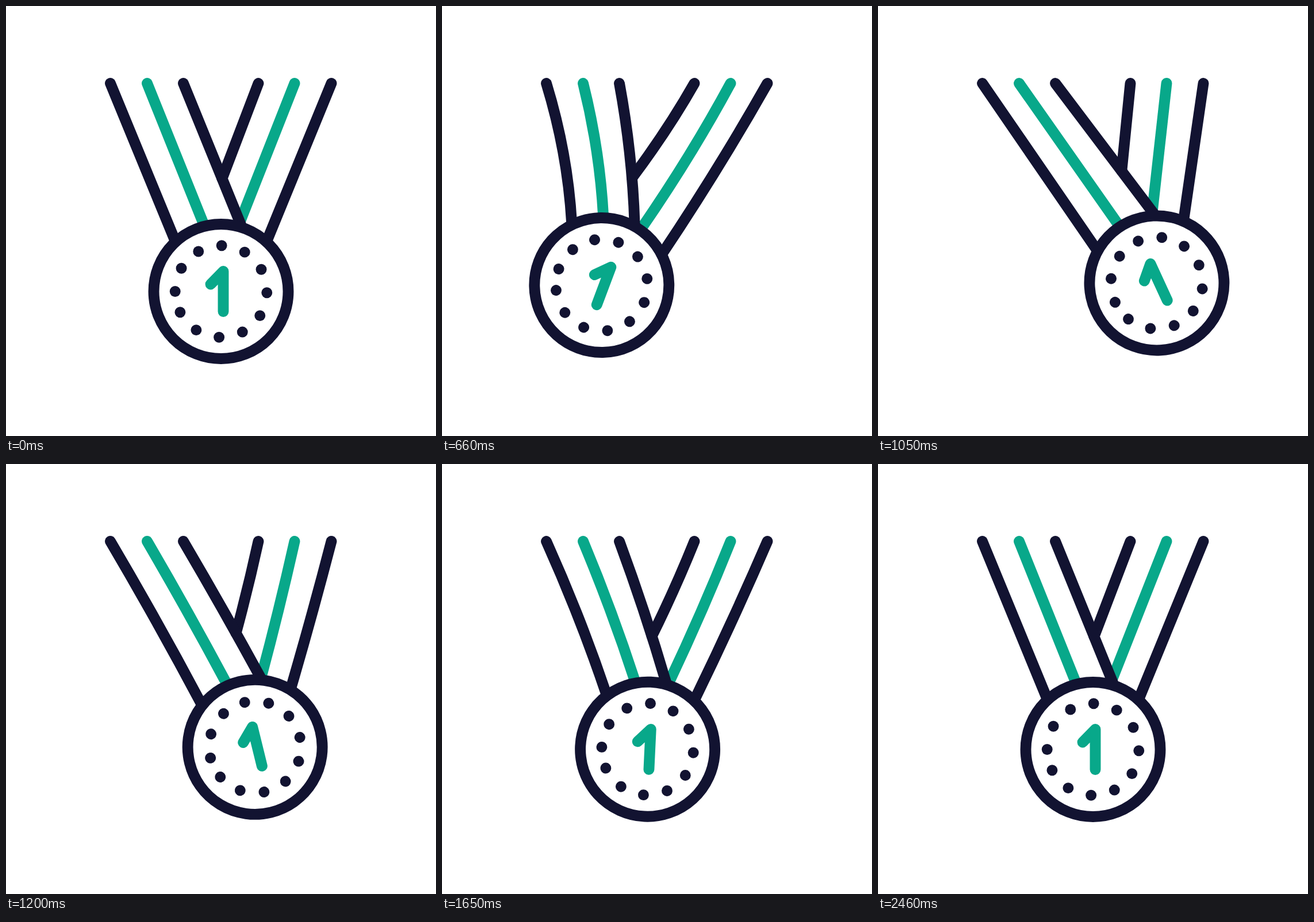
Animation, 748 px wide and 748 px high, one loop 3.09 s. Source, as an HTML page:

```html
<!DOCTYPE html>
<html lang="en">
<head>
<meta charset="utf-8">
<title>Swinging medal</title>
<style>
  html, body { margin: 0; width: 100%; height: 100%; overflow: hidden; background: #fff; }
  svg { display: block; width: 100vw; height: 100vh; }
  path, circle { fill: none; stroke: #121331; stroke-width: 18.9; stroke-linecap: round; stroke-linejoin: round; }
  .green { stroke: #08a88a; }
  .disc { fill: #fff; }
</style>
</head>
<body>
<svg viewBox="0 0 748 748">
  <g id="ribbons"></g>
  <g id="medal">
    <circle class="disc" r="117"/>
    <g id="dots"></g>
    <path class="green" d="M-18 -12.5L4 -35V35"/>
  </g>
</svg>
<script>
const LOOP = 3090, STEP = 30, END = 2460, TOP = 134.5;

// Key times of the decaying swing, with the pose reached at each one
const times = [0, 603, 990, 1480, 1970, END];
const shift = [0, -109.5, 117, -30, 19, 0];
const spin = [0, 23.5, -26, 5, -3.2, 0];
const bow = [0, 1, 0, 0.65, 0, 0];

// x: top end, angle: place on the rim at rest, turn: change of that angle per key
const bands = {
  rightOuter: { x: 566, angle: 42, bend: 4, turn: [0, 22.7, -20, 3.8, -5, 0] },
  rightMid: { x: 502, angle: 15, bend: 5, turn: [0, 22.5, -20, 5.2, -4, 0], green: true },
  rightInner: { x: 439, bend: 4 },
  leftOuter: { x: 181.5, angle: -42, bend: 8, turn: [0, 18.5, -20, 7.6, -1, 0] },
  leftMid: { x: 245.5, angle: -14.4, bend: 6, turn: [0, 18, -20, 6.3, -2.2, 0], green: true },
  leftInner: { x: 308.5, angle: 17, bend: 5, turn: [0, 13.5, -20, 0.2, -5.5, 0] }
};

const rad = deg => deg * Math.PI / 180;
const mix = (a, b, p) => a + (b - a) * p;
const smooth = s => s * s * (3 - 2 * s);

function bezier(x1, y1, x2, y2) {
  const curve = (a, b, u) => 3 * a * u * (1 - u) ** 2 + 3 * b * u * u * (1 - u) + u ** 3;
  return s => {
    let lo = 0, hi = 1;
    for (let i = 0; i < 24; i++) {
      const mid = (lo + hi) / 2;
      if (curve(x1, x2, mid) < s) lo = mid; else hi = mid;
    }
    return curve(y1, y2, lo);
  };
}
const push = bezier(0.15, 0.15, 0, 1);
const lag = bezier(0.33, 0, 0.15, 1);

function add(parent, tag, attrs) {
  const el = document.createElementNS("http://www.w3.org/2000/svg", tag);
  for (const name in attrs) el.setAttribute(name, attrs[name]);
  return parent.appendChild(el);
}

const medal = document.getElementById("medal");
const ribbons = document.getElementById("ribbons");
for (const band of Object.values(bands)) {
  band.el = add(ribbons, "path", { class: band.green ? "green" : "dark" });
}
for (let i = 0; i < 12; i++) {
  const a = rad(270 + 30.27 * i);
  const x = 79.8 * Math.sin(a), y = -79.8 * Math.cos(a);
  add(document.getElementById("dots"), "path", { d: `M${x} ${y}h.01` });
}

function drawBand(band, end, bowNow) {
  const mid = [(band.x + end[0]) / 2 + 2 * band.bend * bowNow, (TOP + end[1]) / 2];
  band.el.setAttribute("d", `M${band.x} ${TOP}Q${mid} ${end}`);
  return u => [0, 1].map(i =>
    (1 - u) ** 2 * [band.x, TOP][i] + 2 * u * (1 - u) * mid[i] + u * u * end[i]);
}

function draw(t) {
  let k = 0;
  while (k < times.length - 2 && t >= times[k + 1]) k++;
  const s = (t - times[k]) / (times[k + 1] - times[k]);
  const at = (keys, first = push) => mix(keys[k], keys[k + 1], (k ? smooth : first)(s));

  const dx = at(shift), cx = 374 + dx, cy = 496.5 - dx * dx / 845;
  const bowNow = at(bow);
  medal.setAttribute("transform", `translate(${cx} ${cy}) rotate(${at(spin, lag)})`);

  let inner;
  for (const band of Object.values(bands)) {
    if (!band.turn) continue;
    const a = rad(band.angle + at(band.turn));
    const point = drawBand(band, [cx + 120 * Math.sin(a), cy - 120 * Math.cos(a)], bowNow);
    if (band === bands.leftInner) inner = point;
  }
  // This strip stops where it meets the crossing edge
  drawBand(bands.rightInner, inner(0.67), bowNow);
}

function tick() {
  const t = performance.now() % LOOP;
  draw(Math.min(END, Math.floor(t / STEP) * STEP));
  requestAnimationFrame(tick);
}
tick();
</script>
</body>
</html>
```
